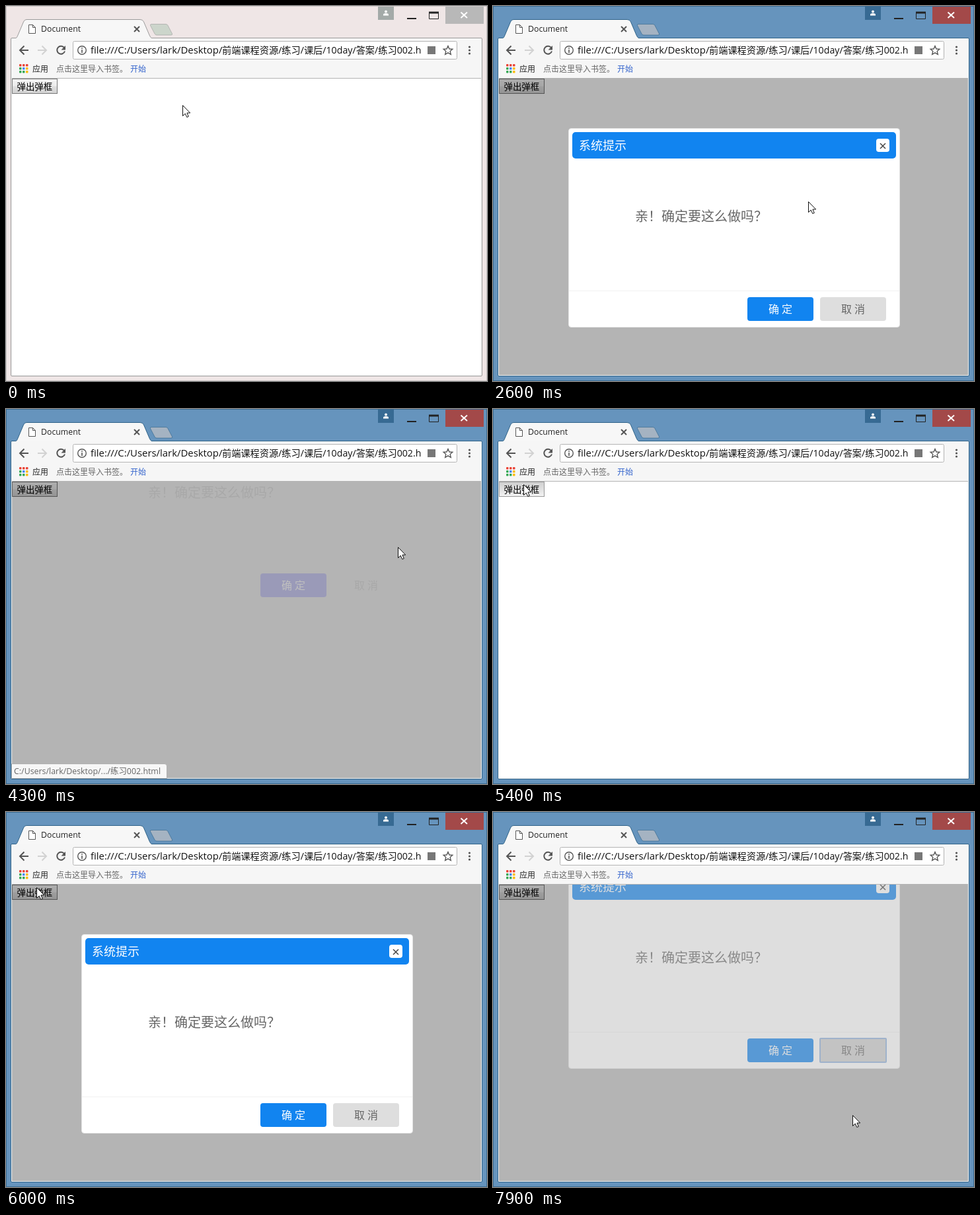
Recreate the animation shown at these times as an HTML page. Size 728 px wide and 568 px high, loop 8 s.

```html
<!DOCTYPE html>
<html lang="zh">
<head>
<meta charset="utf-8">
<title>Dialog</title>
<style>
html, body { margin: 0; width: 100%; height: 100%; overflow: hidden; }
svg { display: block; font-family: "Open Sans", "Noto Sans CJK SC", "Noto Sans CJK", sans-serif; }
#win { --frame: #6694bd; --edge: #3b6c92; --rim: #2f6389; --badge: #376a93; --close: #a34949; --plus: #a5b3c2; }
#win.idle { --frame: #efe6e6; --edge: #cfcaca; --rim: #9c9c9c; --badge: #a3aaa8; --close: #b8b8b8; --plus: #ccd5cb; }
.line { fill: none; stroke: #555; stroke-width: 2; }
#card.faint .pane { fill: none; stroke: none; }
#card.faint #ok { fill: #0b0bd2; }
</style>
</head>
<body>
<svg id="win" width="728" height="568" viewBox="0 0 728 568">
  <defs>
    <clipPath id="page"><rect x="9" y="110" width="710" height="449"/></clipPath>
    <linearGradient id="up" x2="0" y2="1">
      <stop offset="0" stop-color="#f4f4f4"/><stop offset=".48" stop-color="#ececec"/>
      <stop offset=".52" stop-color="#dfdfdf"/><stop offset="1" stop-color="#d2d2d2"/>
    </linearGradient>
    <linearGradient id="down" x2="0" y2="1">
      <stop offset="0" stop-color="#cfcfcf"/><stop offset=".5" stop-color="#e0e0e0"/><stop offset="1" stop-color="#f4f4f4"/>
    </linearGradient>
  </defs>

  <!-- window frame -->
  <rect x=".5" y=".5" width="727" height="567" fill="var(--frame)" stroke="var(--edge)"/>
  <rect x="7.5" y="48.5" width="713" height="512" rx="1.5" fill="#f6f6f6" stroke="var(--rim)"/>
  <path d="M14 49C17 48 17 46 18.500 43L26.500 24Q28 20.500 31 20.500H203Q207 20.500 208.500 24L217 44Q218.500 48 221 49" fill="#f7f7f7" stroke="var(--rim)"/>
  <rect x="13" y="49" width="209" height="3" fill="#f6f6f6"/>
  <path d="M220 27.500H242Q244 27.500 245 29.500L251.500 42Q252 44 250 44H228Q226 44 225 42L218.500 29.500Q218 27.500 220 27.500Z" fill="var(--plus)" stroke="var(--rim)" stroke-opacity=".6"/>
  <rect x="563" y="1" width="24" height="20" fill="var(--badge)"/>
  <path d="M571 14.500V13Q571 11 575 11T579 13V14.500Z" fill="#fff"/><circle cx="575" cy="8.500" r="2" fill="#fff"/>
  <path d="M607 19H621" stroke="#222" stroke-width="2"/>
  <path d="M640.500 9V19.500H654.500V9" fill="none" stroke="#222"/><path d="M640 10H655" stroke="#222" stroke-width="3"/>
  <rect x="665" y="1" width="58" height="26" fill="var(--close)"/>
  <path d="M688.500 9.500L698 18M698 9.500L688.500 18" stroke="#fff" stroke-width="2"/>
  <path d="M34.500 28.500H40.500L44.500 32.500V41.500H34.500ZM40.500 28.500V32.500H44.500" fill="#fff" stroke="#555"/>
  <text x="53" y="39" font-size="12.3" fill="#222">Document</text>
  <path class="line" stroke-width="1.5" d="M194 31L202 39M202 31L194 39"/>

  <!-- toolbar -->
  <path class="line" d="M34 67H21M27.500 60.500L21 67L27.500 73.500"/>
  <path class="line" style="stroke:#d2d2d2" d="M48 67H61M54.500 60.500L61 67L54.500 73.500"/>
  <path class="line" d="M88 63A6 6 0 1 0 89 68.500"/><path d="M90 60V66.500H83.500Z" fill="#555"/>
  <rect x="101.500" y="53.500" width="581" height="27" rx="2" fill="#fff" stroke="#b4b4b4"/>
  <circle cx="115" cy="67" r="6.300" fill="none" stroke="#555" stroke-width="1.400"/>
  <path d="M115 66V71M115 63V64.700" stroke="#555" stroke-width="1.600"/>
  <text x="128" y="72" font-size="14.9" fill="#111">file:///C:/Users/lark/Desktop/</text>
  <text x="327" y="72" font-size="14.2" fill="#111">前端课程资源/练习/课后/10day/答案/练习002.h</text>
  <rect x="638" y="61" width="12" height="12" fill="#777"/>
  <path d="M669 60.500L671 65L675.800 65.400L672.200 68.600L673.300 73.400L669 70.900L664.700 73.400L665.800 68.600L662.200 65.400L667 65Z" fill="none" stroke="#555" stroke-width="1.400"/>
  <path d="M701.500 62V73" stroke="#555" stroke-width="3.200" stroke-dasharray="0 5" stroke-linecap="round"/>
  <g id="apps"></g>
  <g font-size="12">
    <text x="40" y="100" fill="#222">应用</text>
    <text x="76" y="100" fill="#666">点击这里导入书签。</text>
    <text x="188" y="100" fill="#3363cc">开始</text>
  </g>

  <!-- page -->
  <rect x="9" y="110" width="710" height="449" fill="#fff"/>
  <path d="M9 109.500H719" stroke="#b4b4b4"/>
  <g clip-path="url(#page)">
    <rect id="btn" x="9.500" y="110.500" width="68" height="22"/>
    <text x="16.500" y="127" font-size="13.4" fill="#000">弹出弹框</text>
    <rect id="shade" x="9" y="109" width="710" height="450" fill-opacity=".295"/>
    <g id="card">
      <rect class="pane" x="114.500" y="185.500" width="501" height="301" rx="4" fill="#fff" stroke="#e4e4e4"/>
      <rect x="120" y="191" width="490" height="40" rx="5" fill="#1184f0"/>
      <text x="130" y="218" font-size="18" fill="#fff">系统提示</text>
      <rect x="580" y="201" width="20" height="20" rx="4" fill="#fff"/>
      <path d="M586 208L594 216M594 208L586 216" stroke="#444" stroke-width="1.500"/>
      <text x="215" y="326" font-size="20" fill="#666">亲！确定要这么做吗？</text>
      <path class="pane" d="M115 431.500H615" stroke="#f1f1f1"/>
      <rect id="ok" x="385" y="441" width="100" height="36" rx="4" fill="#1184f0"/>
      <rect class="pane" x="495" y="441" width="100" height="36" rx="4" fill="#dedede"/>
      <rect id="ring" x="495" y="441" width="100" height="36" rx="1" fill="#cfcfcf" stroke="#8fb2de" stroke-width="2"/>
      <g font-size="16" text-anchor="middle">
        <text x="435" y="465" fill="#fff">确 定</text>
        <text x="545" y="465" fill="#666">取 消</text>
      </g>
    </g>
  </g>
  <g id="status">
    <path d="M8.500 559.500V537.500H240Q243.500 537.500 243.500 541V559.500Z" fill="#f7f7f7" stroke="#b0b0b0"/>
    <text x="12" y="553" font-size="12.4" fill="#666">C:/Users/lark/Desktop/.../练习002.html</text>
  </g>
  <path id="cursor" d="M.5 .5V16.500L4.200 13L6.800 18.500L9.300 17.400L6.900 12H11.700Z" fill="#fff" stroke="#111"/>
</svg>
<script>
const $ = id => document.getElementById(id);
const LOOP = 8000, TICK = 100, SLIDE = 400, DROP = 225;

const red = '#ea4335', green = '#34a853', blue = '#4285f4', amber = '#fbbc05';
$('apps').innerHTML = [red, red, red, green, blue, amber, green, green, amber].map((c, i) =>
  `<rect x="${20 + i % 3 * 5}" y="${88 + (i / 3 | 0) * 5}" width="3.500" height="3.500" rx="1" fill="${c}"/>`).join('');

// Pointer path: time, x, y
const path = [
  [0, 267, 150], [700, 267, 150], [900, 215, 152], [1200, 90, 138], [1400, 45, 122],
  [2200, 45, 122], [2300, 150, 200], [2400, 300, 282], [2500, 420, 310], [2600, 477, 296],
  [2800, 530, 262], [3000, 585, 215], [3100, 601, 198], [3200, 588, 212], [3300, 593, 209],
  [4400, 593, 209], [4700, 262, 142], [4900, 120, 124], [5200, 46, 114],
  [6600, 46, 114], [6900, 240, 240], [7200, 480, 420], [7400, 544, 459], [LOOP, 544, 459]
];
// Dialog: start of fall, start of rise
const shows = [[1520, 4000], [5520, 7716]];

const clamp = x => Math.min(1, Math.max(0, x));
const swing = x => .5 - Math.cos(Math.PI * clamp(x)) / 2;
const within = (t, a, b) => t >= a && t < b;

function pointer(t) {
  const i = path.findIndex(p => p[0] > t);
  const [t0, x0, y0] = path[i - 1], [t1, x1, y1] = path[i];
  const k = (t - t0) / (t1 - t0);
  return [Math.round(x0 + (x1 - x0) * k), Math.round(y0 + (y1 - y0) * k)];
}

function show(id, alpha) { $(id).setAttribute('opacity', +alpha); }

function draw(t) {
  $('win').classList.toggle('idle', t < 400);
  const pressed = within(t, 5400, 5500);
  $('btn').setAttribute('fill', `url(#${pressed ? 'down' : 'up'})`);
  $('btn').setAttribute('stroke', pressed ? '#999' : '#777');

  const open = Math.max(...shows.map(([a, b]) =>
    swing((t - a) / SLIDE) * (1 - swing((t - b) / SLIDE))));
  show('shade', within(t, 1600, 4400) || t >= 5500);
  show('card', open);
  $('card').setAttribute('transform', `translate(0 ${Math.round((open - 1) * DROP)})`);
  $('card').classList.toggle('faint', open < .2);
  show('ring', t >= 7600);

  show('status', clamp((t - 3400) / 200) * (1 - clamp((t - 4700) / 300)));
  $('cursor').setAttribute('transform', `translate(${pointer(t)})`);
}

function frame() {
  draw(Math.floor(performance.now() % LOOP / TICK) * TICK);
  requestAnimationFrame(frame);
}
frame();
</script>
</body>
</html>
```
